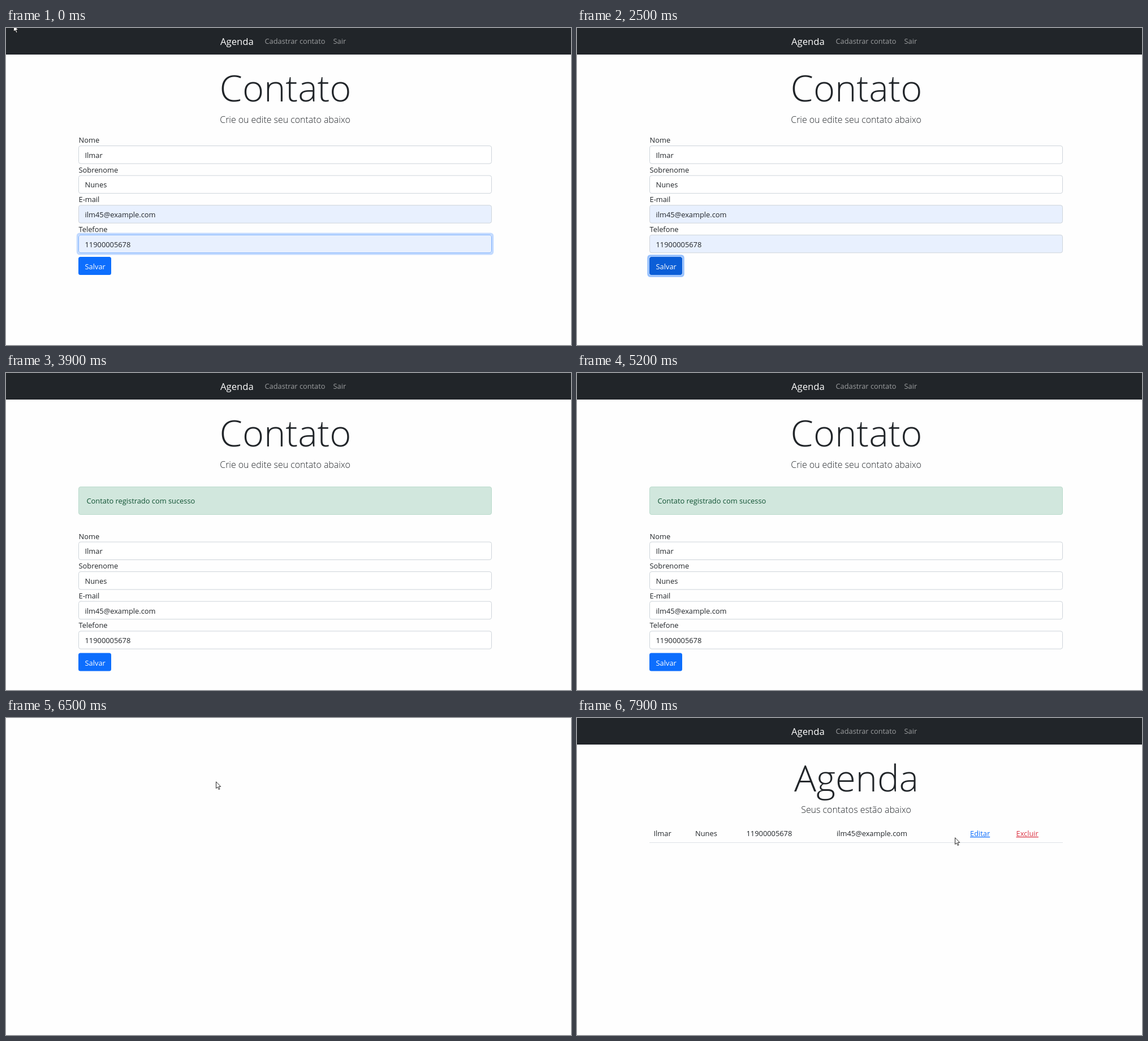
These frames come from a looping animation (999 px wide and 561 px high, 8 s). An HTML page:

```html
<!DOCTYPE html>
<html lang="pt">
<head>
<meta charset="utf-8">
<title>Agenda</title>
<style>
  html, body { margin: 0; width: 100%; height: 100%; overflow: hidden; background: #fefefe; }
  svg { display: block; width: 100%; height: 100%; }
  text { font: 12.85px "Open Sans", "Noto Sans", sans-serif; fill: #212529; }
  .brand { font-size: 16.7px; fill: #fff; }
  .nav { font-size: 12.8px; fill: #9b9d9f; }
  .title { font-size: 65px; font-weight: 300; text-anchor: middle; }
  .lead { font-size: 15.9px; font-weight: 300; text-anchor: middle; }
  .input { fill: #fff; stroke: #ced4da; }
  .ring { fill: none; stroke-width: 3.4; }
  .link { text-decoration: underline; }
</style>
</head>
<body>
<svg id="stage" viewBox="0 0 999 561" xmlns="http://www.w3.org/2000/svg"></svg>
<script>
const LOOP = 8000, STEP = 100;
const HOVER = 800, PRESS = 900, SENT = 2700, BLANK = 6500, LIST = 6600;
const LEFT = 128.5, WIDTH = 730, PAD = 11;
const person = { Nome: 'Ilmar', Sobrenome: 'Nunes', 'E-mail': 'ilm45@example.com', Telefone: '11900005678' };
const [first, last, mail, phone] = Object.values(person);

const text = (x, y, s, attrs = '') => `<text x="${x}" y="${y}" ${attrs}>${s}</text>`;
const rect = (x, y, w, h, attrs) => `<rect x="${x}" y="${y}" width="${w}" height="${h}" rx="3.5" ${attrs}/>`;
const ring = (id, x, y, w, h, attrs) => rect(x - 2, y - 2, w + 4, h + 4, `id="${id}" class="ring" ${attrs}`);
const link = (x, s, color) => text(x, 209, s, `class="link" style="fill:${color}"`);
const heading = (title, lead) =>
  text(494, 130, title, 'class="title"') + text(493.5, 168, lead, 'class="lead"');

const rowY = i => 208.5 + i * 52.6;
const field = ([label, value], i) =>
  text(LEFT, rowY(i) - 5.5, label) +
  rect(LEFT, rowY(i), WIDTH, 31.5, `class="input" id="in${i}"`) +
  text(LEFT + PAD, rowY(i) + 21.3, value);

stage.innerHTML = `
  <g id="bar">
    <rect width="999" height="47" fill="#212529"/>
    ${text(379, 30, 'Agenda', 'class="brand"')}
    ${text(457.5, 28, 'Cadastrar contato', 'class="nav"')}
    ${text(578.5, 28, 'Sair', 'class="nav"')}
  </g>
  <g id="edit">
    ${heading('Contato', 'Crie ou edite seu contato abaixo')}
    <g id="alert">
      ${rect(LEFT, 201.5, WIDTH, 49, 'fill="#d1e7dd" stroke="#badbcc"')}
      ${text(142.5, 231, 'Contato registrado com sucesso', 'style="fill:#0f5132"')}
    </g>
    <g id="form">
      ${Object.entries(person).map(field).join('')}
      ${ring('inRing', LEFT, rowY(3), WIDTH, 31.5, 'stroke="#0d6efd" stroke-opacity=".25"')}
      ${rect(128, 405, 58, 32, 'id="save"')}
      ${ring('saveRing', 128, 405, 58, 32, 'stroke="#3184fd" stroke-opacity=".5"')}
      ${text(LEFT + PAD, 427, 'Salvar', 'style="fill:#fff"')}
    </g>
  </g>
  <g id="list">
    ${heading('Agenda', 'Seus contatos estão abaixo')}
    ${text(135.5, 209, first)}${text(209, 209, last)}${text(299.5, 209, phone)}${text(459, 209, mail)}
    ${link(695, 'Editar', '#0d6efd')}${link(776.5, 'Excluir', '#dc3545')}
    <path d="M128 220.5H859" stroke="#dee2e6"/>
  </g>
  <path id="cursor" d="M.5 .8V12.6L3.2 10.1 5.2 14.5 7 13.7 5.1 9.4H8.7Z" fill="#fff" stroke="#111" stroke-width=".9"/>`;

const $ = id => document.getElementById(id);
const show = (id, on) => $(id).style.display = on ? '' : 'none';
const ease = p => p * p * (3 - 2 * p);

// Each move glides from the previous stop: departure, arrival, x, y.
const moves = [
  [0, 0, 13, -6], [0, 900, 158, 420], [1000, 1200, 335, 407], [1300, 1800, 517, 355],
  [BLANK, BLANK, 371, 112], [LIST, 7300, 109, 219], [7300, 7500, 228, 217], [7600, 7900, 668, 211]
];

function pointer(t) {
  const i = moves.findLastIndex(m => m[0] <= t);
  const [from, to, ...end] = moves[i];
  const start = to > from ? moves[i - 1].slice(2) : end;
  const p = ease(Math.min(1, (t - from) / (to - from || 1)));
  return end.map((v, j) => Math.round(start[j] + (v - start[j]) * p));
}

function draw(now) {
  const t = Math.floor(now % LOOP / STEP) * STEP;
  const sent = t >= SENT, focus = t < PRESS;
  show('bar', t !== BLANK);
  show('edit', t < BLANK);
  show('list', t >= LIST);
  show('alert', sent);
  show('inRing', focus);
  show('saveRing', t > PRESS && !sent);
  show('cursor', t < 2200 || t >= BLANK);
  $('form').setAttribute('transform', `translate(0 ${sent ? 90.5 : 0})`);
  $('in2').style.fill = $('in3').style.fill = sent ? '#fff' : '#e8f0fe';
  $('in3').style.stroke = focus ? '#86b7fe' : '#ced4da';
  $('save').style.fill = t >= HOVER && !sent ? '#0b5ed7' : '#0d6efd';
  $('cursor').setAttribute('transform', `translate(${pointer(t)})`);
  requestAnimationFrame(draw);
}
requestAnimationFrame(draw);
</script>
</body>
</html>
```
